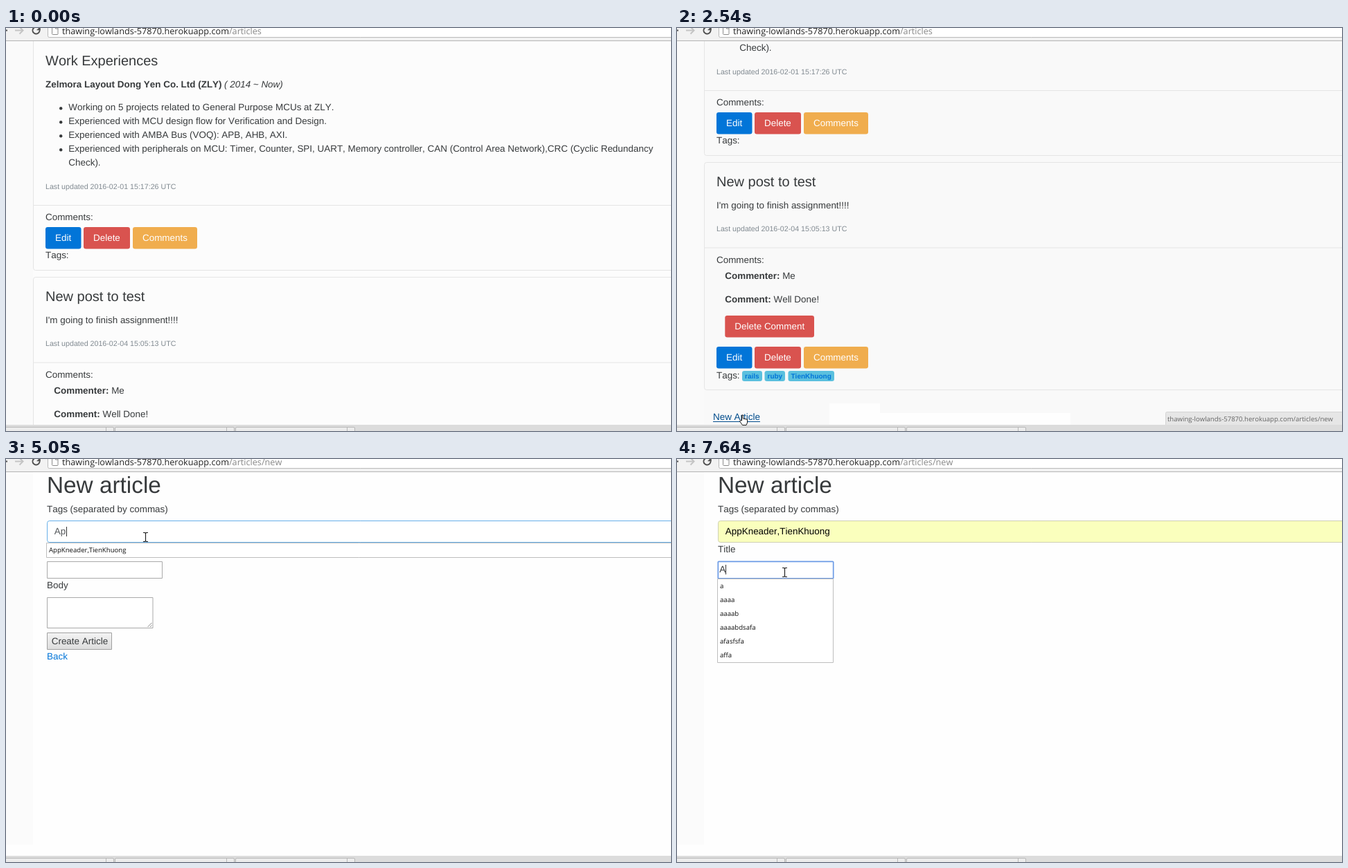
Animation of 960x583 px, one loop 8000 ms. Source, as an HTML page with a canvas:

```html
<!DOCTYPE html>
<html lang="en">
<head>
<meta charset="utf-8">
<title>New article</title>
<style>
  html, body { margin: 0; width: 100%; height: 100%; overflow: hidden; background: #fefefe; }
  canvas { display: block; }
</style>
</head>
<body>
<canvas id="stage" width="960" height="583"></canvas>
<script>
const ctx = document.getElementById('stage').getContext('2d');
const LOOP = 8000;
const SANS = '"Liberation Sans", Arial, sans-serif';
const UI = '"Open Sans", "Noto Sans", sans-serif';
const INK = '#373a3c', LINK = '#0275d8', RED = '#d9534f', AMBER = '#f0ad4e';
const HOST = 'thawing-lowlands-57870.herokuapp.com';
const TAG = 'TienKhuong';
const TAGS_VALUE = 'AppKneader,' + TAG;

// Step tracks: each row starts with the time at which it takes over.
const pointerTrack = [
  [0], [1040, 'arrow', 558, 557], [1160, 'arrow', 283, 557], [1280, 'arrow', 220, 543], [1420],
  [1700, 'arrow', 49, 571], [1850, 'hand', 72, 563], [1980, 'hand', 90, 559],
  [2930, 'arrow', 222, 141], [3050, 'arrow', 206, 122], [3170, 'beam', 202, 105],
  [3820, 'beam', 203, 110], [3940, 'beam', 202, 111], [4490, 'beam', 201, 113],
  [6310, 'beam', 195, 121], [6440, 'arrow', 186, 125], [6560, 'arrow', 182, 126],
  [6960, 'arrow', 155, 152], [7110, 'beam', 155, 164]
];
const scrollTrack = [[0, 0], [630, 162], [760, 166]];
const bubbleTrack = [[0, 0], [2120, .5], [2250, 1], [2930, .4], [3050, 0]];
const caretTrack = [[0, 0], [3570, 1], [4060, 0], [4490, 1], [5780, 0], [6310, 1]];
const typedTrack = [[0, ''], [4770, 'A'], [5050, 'Ap'], [5330, 'App'], [6440, TAGS_VALUE]];
const tagChoices = [[0, []], [4770, ['a', 'aa', 'aaaa', TAGS_VALUE, 'abc', 'asdf']],
  [5050, [TAGS_VALUE]], [6810, []]];
const titleChoices = ['a', 'aaaa', 'aaaab', 'aaaabdsafa', 'afasfsfa', 'affa'];

const step = (track, t) => track.filter(row => row[0] <= t).pop();
const value = (track, t) => step(track, t)[1];

function rect(x, y, w, h, color) {
  ctx.fillStyle = color;
  ctx.fillRect(x, y, w, h);
}

function box(x, y, w, h, radius, fill, stroke, width = 1) {
  ctx.beginPath();
  ctx.roundRect(x, y, w, h, radius);
  if (fill) { ctx.fillStyle = fill; ctx.fill(); }
  if (stroke) { ctx.strokeStyle = stroke; ctx.lineWidth = width; ctx.stroke(); }
}

function path(points, stroke, width = 1, fill) {
  ctx.beginPath();
  points.forEach(([x, y]) => ctx.lineTo(x, y));
  if (fill) { ctx.closePath(); ctx.fillStyle = fill; ctx.fill(); }
  ctx.strokeStyle = stroke;
  ctx.lineWidth = width;
  ctx.stroke();
}

// Draws text whose capitals are centred on y; returns the x where it ends.
function text(str, x, y, { size = 13.45, color = INK, style = '', family = SANS } = {}) {
  ctx.font = `${style} ${size}px ${family}`;
  ctx.fillStyle = color;
  ctx.fillText(str, x, y + size * .36 - .5);
  return x + ctx.measureText(str).width;
}

function button(label, x, y, w, color) {
  box(x, y, w, 31.5, 3.3, color);
  text(label, x + 14, y + 15.7, { color: '#fff' });
}

function buttonRow(y) {
  button('Edit', 57, y, 51.5, LINK);
  button('Delete', 112, y, 67, RED);
  button('Comments', 183, y, 93, AMBER);
}

function card(top, divider, bottom) {
  box(39.5, top, 960, bottom - top, 3.3, null, '#e5e5e5');
  rect(40, divider, 920, 1, '#e5e5e5');
}

function updated(stamp, y) {
  text(`Last updated ${stamp} UTC`, 57, y, { size: 10.67, color: '#818a91' });
}

function field(label, content, y) {
  text(content, text(label + ' ', 69.3, y, { style: 'bold' }), y);
}

function articles(t) {
  const scroll = value(scrollTrack, t);
  rect(0, 19, 960, 555, '#fafafa');
  rect(39, 19, 921, 555, scroll ? '#f9f9f9' : '#fcfcfc');
  if (t >= 1160) rect(283, 557, 285, 17, '#fefefe');
  if (t >= 1280) rect(220, 543, 73, 31, '#fefefe');

  ctx.save();
  ctx.translate(0, -scroll);
  card(-20.5, 256, 350.5);
  text('Work Experiences', 57, 47.5, { size: 20 });
  text('Zelmora Layout Dong Yen Co. Ltd (ZLY)', 57, 81.5, { style: 'bold' });
  text('( 2014 ~ Now)', 315, 81.5, { style: 'italic' });
  [
    'Working on 5 projects related to General Purpose MCUs at ZLY.',
    'Experienced with MCU design flow for Verification and Design.',
    'Experienced with AMBA Bus (VOQ): APB, AHB, AXI.',
    'Experienced with peripherals on MCU: Timer, Counter, SPI, UART, Memory controller, ' +
      'CAN (Control Area Network),CRC (Cyclic Redundancy'
  ].forEach((line, i) => {
    const y = 115 + 20 * i;
    box(77, y - 1, 4.4, 4.4, 2.2, INK);
    text(line, 90.3, y);
  });
  text('Check).', 90.3, 195);
  updated('2016-02-01 15:17:26', 229.7);
  text('Comments:', 57, 274);
  buttonRow(288);
  text('Tags:', 57, 329);

  card(360.5, 483.5, 689.5);
  text('New post to test', 57, 388.7, { size: 20 });
  text("I'm going to finish assignment!!!!", 57, 422.7);
  updated('2016-02-04 15:05:13', 457);
  text('Comments:', 57, 501.3);
  field('Commenter:', 'Me', 524.8);
  field('Comment:', 'Well Done!', 558.3);
  button('Delete Comment', 69.3, 582, 128.7, RED);
  buttonRow(627);
  text('Tags:', 57, 668.8);
  [['rails', 94, 29], ['ruby', 126.5, 29.5], [TAG, 160.5, 66.5]].forEach(([name, x, w]) => {
    box(x, 662, w, 15, 3.3, '#5bc0de');
    text(name, x + 4, 669.8, { size: 10, style: 'bold', color: LINK });
  });
  const hovered = t >= 1850;
  const color = hovered ? '#014c8c' : LINK;
  const end = text('New Article', 52, 729, { color });
  if (hovered) rect(52, 735, end - 52, 1, color);
  ctx.restore();
}

function suggestions(x, y, w, names, selected) {
  if (!names.length) return;
  box(x, y, w, names.length * 20 + 1, 0, '#fff', '#bdbdbd');
  if (selected) rect(x + .5, y + .5, w - 1, 20, '#cdcdcd');
  names.forEach((name, i) =>
    text(name, 62, y + 10.5 + 20 * i, { size: 9.6, family: UI, color: '#111' }));
}

function caret(x, y, h = 14) {
  rect(x, y, 1, h, '#333');
}

function newArticle(t) {
  rect(0, 19, 960, 555, '#fefefe');
  rect(0, 19, 39, 539, '#fbfbfb');
  text('New article', 59, 38, { size: 33.33 });
  text('Tags (separated by commas)', 59, 72.3);

  const filled = t >= 6440;
  const onTags = t >= 3570 && t < 7260;
  const onTitle = t >= 7260;
  box(59.5, 89.5, 960, 31, 3.3, filled ? '#faffbd' : '#fff',
    onTags ? '#66afe9' : filled ? '#cfd0b4' : '#ccc');
  const typedEnd = text(value(typedTrack, t), 69.8, 104.8, { color: filled ? '#000' : '#55595c' });
  if (onTags && value(caretTrack, t)) caret(Math.floor(typedEnd) + 1, 98);

  text('Title', 59, 131);
  box(59.5, 148.5, 166, 24, 0, '#fff', '#a9a9a9');
  if (onTitle) {
    box(59.3, 148.3, 166.4, 24.6, 1, null, '#6c9be6', 1.7);
    const end = t >= 7640 ? text('A', 61.3, 160) : 61.3;
    caret(Math.floor(end), 153);
  }
  text('Body', 59, 183);
  box(59.5, 200.5, 152.5, 44, 0, '#fff', '#a9a9a9');
  path([[204.5, 243], [210.5, 237]], '#888');
  path([[208, 243], [210.5, 240.5]], '#888');

  const shade = ctx.createLinearGradient(0, 251, 0, 276);
  shade.addColorStop(0, '#f4f4f4');
  shade.addColorStop(1, '#dcdcdc');
  box(59.5, 251.5, 93, 24, 0, shade, '#a0a0a0');
  text('Create Article', 65.7, 263.3);
  text('Back', 59, 285.7, { color: LINK });

  suggestions(58.5, 121.5, 960, value(tagChoices, t), filled);
  if (t >= 7640) suggestions(58.5, 173.5, 167, titleChoices);
}

function toolbar(route) {
  rect(0, 0, 960, 19, '#f2f2f2');
  box(60.5, -12, 960, 25.5, 2, '#fff', '#b9b9b9');
  rect(0, 18, 960, 1, '#b4b4b4');
  path([[0, 3.5], [2, 3.5]], '#555', 2);
  path([[13, 3.5], [24, 3.5]], '#c4c4c4', 2);
  path([[19.5, -1.5], [24.5, 3.5], [19.5, 8.5]], '#c4c4c4', 2);
  ctx.beginPath();
  ctx.arc(43.5, 3.5, 5, -.7, 5.1);
  ctx.strokeStyle = '#505050';
  ctx.lineWidth = 2;
  ctx.stroke();
  path([[49.5, -2], [49.5, 3], [44.5, 3]], '#505050', .5, '#505050');
  box(66.5, -3.5, 8.5, 13, 1, '#fff', '#8a8a8a');
  path([[71.5, -3], [71.5, 1], [75, 1]], '#8a8a8a');
  const font = { size: 12.68, family: UI };
  text(route, text(HOST, 81, 4.7, { ...font, color: '#222' }), 4.7, { ...font, color: '#888' });
}

function shelf() {
  rect(0, 574, 960, 9, '#dcdcdc');
  [-17, 157, 331].forEach(x => {
    box(x + .5, 577.5, 172, 12, 1.5, '#ececec', '#b8b8b8');
    rect(x + 161, 578, 1, 5, '#b8b8b8');
  });
}

function statusBubble(alpha) {
  if (!alpha) return;
  ctx.save();
  ctx.globalAlpha = alpha;
  box(705.5, 555.5, 260, 22, 2, '#e6e6e6', '#d4d4d4');
  text(HOST + '/articles/new', 708, 566, { size: 9.55, family: UI, color: '#646464' });
  ctx.restore();
}

const pointers = {
  arrow() {
    path([[.5, .5], [.5, 13], [3.3, 10.4], [5.4, 15.2], [7.4, 14.3], [5.4, 9.7], [9.3, 9.7]],
      '#000', .9, '#fff');
  },
  beam() {
    path([[-3, -6.5], [-.5, -6.5], [.5, -5.5], [1.5, -6.5], [4, -6.5]], '#222', 1.1);
    path([[-3, 6.5], [-.5, 6.5], [.5, 5.5], [1.5, 6.5], [4, 6.5]], '#222', 1.1);
    path([[.5, -6], [.5, 6]], '#222', 1.2);
  },
  hand() {
    path([[3.5, 9], [3.5, 1], [5.3, 1], [5.3, 6], [11.5, 7.3], [11.5, 12], [10, 15.5],
      [4.5, 15.5], [.7, 10], [1.3, 8.5]], '#000', .9, '#fff');
  }
};

function drawPointer(t) {
  const [, kind, x, y] = step(pointerTrack, t);
  if (!kind) return;
  ctx.save();
  ctx.translate(x, y);
  pointers[kind]();
  ctx.restore();
}

function draw(now) {
  const t = now % LOOP;
  const onForm = t >= 2660;
  if (onForm) newArticle(t); else articles(t);
  toolbar(onForm ? '/articles/new' : '/articles');
  statusBubble(value(bubbleTrack, t));
  shelf();
  drawPointer(t);
}

ctx.textRendering = 'geometricPrecision';
ctx.fontKerning = 'none';
const start = performance.now();
function tick() {
  draw(performance.now() - start);
  requestAnimationFrame(tick);
}
tick();
</script>
</body>
</html>
```
